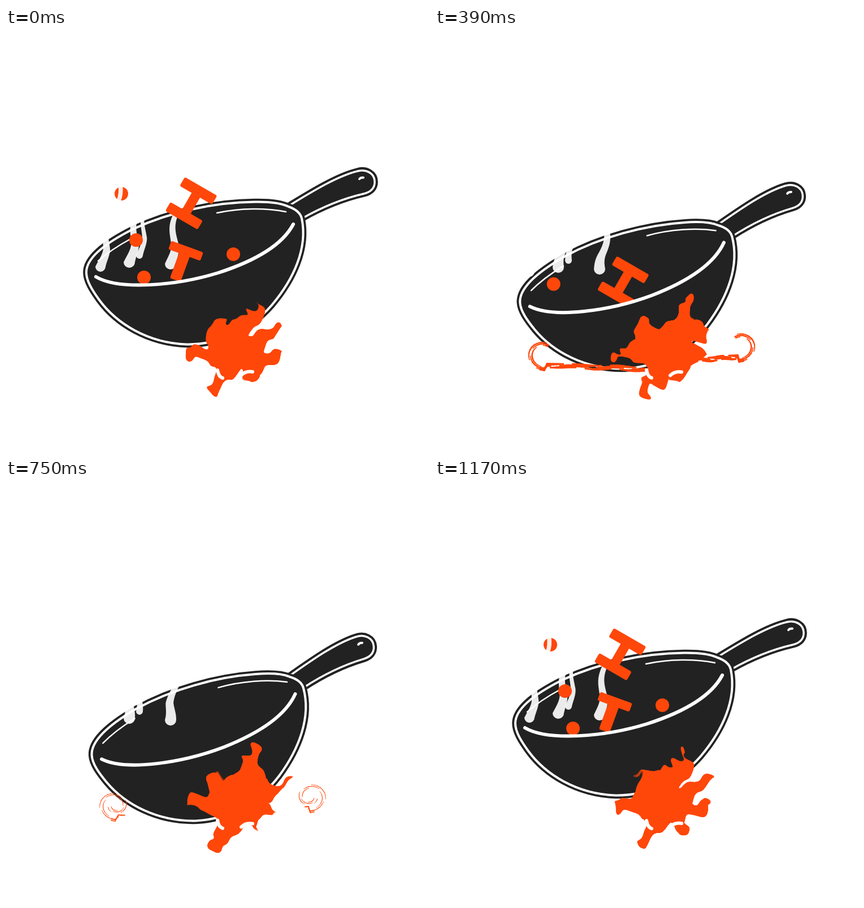
An HTML page with a canvas that plays this animation: 748x748 px, repeating every 1200 ms.

```html
<!DOCTYPE html>
<html lang="en">
<head>
<meta charset="utf-8">
<title>Frying pan</title>
<style>
html, body { margin: 0; width: 100%; height: 100%; overflow: hidden; background: #fff; }
canvas { display: block; }
</style>
</head>
<body>
<canvas id="stage" width="748" height="748"></canvas>
<script>
const ctx = document.getElementById('stage').getContext('2d');
const LOOP = 1200, STEP = 30, TAU = Math.PI * 2;
const ORANGE = '#ff470a', DARK = '#222', WHITE = '#fff';

const { sin, cos, hypot } = Math;
const clamp = x => Math.max(0, Math.min(1, x));
const mix = (a, b, u) => a + (b - a) * u;
const smooth = (from, to, t) => {
  const u = clamp((t - from) / (to - from));
  return u * u * (3 - 2 * u);
};

// ---- pan ----
const RIM = 'M159,440C200,464 300,456 375,433C440,412 488,385 508,347';
const handle = new Path2D('M499,315C540,290 585,262 622,253C637,249 652,257 652,272C652,283 645,290 633,293C598,301 560,316 523,337');
const bowl = new Path2D('M142,432C142,408 170,383 226,355C290,325 370,308 440,307.5C470,307 490,311 500,316C514,321 521,328 523,337C534,390 508,445 470,490C430,536 375,560 320,559.5C250,557 195,522 165,481C152,463 142,447 142,432Z');
const rim = new Path2D(RIM);
const aboveRim = new Path2D(RIM + 'L748,300V-100H-100V440Z');
const shines = new Path2D('M373,327C415,318 460,318 495,325M163,412Q185,392 222,372');
const handleShine = new Path2D('M625,267Q627,264 632,264.5');

function stroke(path, width, color = WHITE) {
  ctx.lineWidth = width;
  ctx.strokeStyle = color;
  ctx.stroke(path);
}

function outlined(path, line) {
  ctx.fillStyle = DARK;
  ctx.fill(path);
  stroke(path, 11.5, DARK);
  stroke(path, line);
}

// The pan sinks first and tilts a little later; both return together.
const lifted = t => smooth(735, 955, t);
const sunk = t => smooth(0, 370, t) - lifted(t);
const tilted = t => smooth(60, 480, t) - lifted(t);

function withPan(t, draw) {
  ctx.translate(657 - 2 * sunk(t), 268 + 24 * sunk(t));
  ctx.rotate(-0.0654 * tilted(t));
  ctx.translate(-657, -268);
  draw();
  ctx.resetTransform();
}

function drawPan() {
  outlined(handle, 3.5);
  outlined(bowl, 4);
  stroke(shines, 2.5);
  stroke(handleShine, 4);
}

// ---- food ----
function boxes(...list) {
  const path = new Path2D();
  for (const box of list) path.roundRect(...box, 3);
  return path;
}
const disc = new Path2D();
disc.arc(0, 0, 12, 0, TAU);

const food = (x, y, dx, dy, more) =>
  ({ x, y, dx, dy, angle: 0, turn: 0, fall: 84, power: 1.75, path: disc, ...more });
const farBall = food(204, 293, 21, 121);
const pieces = [
  food(230, 375, 14, 92),
  food(244, 441, 9, 72),
  food(402, 400, -5, 72),
  food(327.5, 310, 23, 102, { angle: 30, turn: 10, fall: 79, power: 1.55,
    path: boxes([-33, -34.5, 66, 18], [-33, 16.5, 66, 18], [-8.5, -20, 17, 40]) }),
  food(318, 394, 13, 69, { angle: 20, turn: 20,
    path: boxes([-30, -8, 60, 16], [-10, 0, 20, 55]) })
];

function drawFood(items, t) {
  const toTop = ((1140 - Math.min(t, 1140)) / 270) ** 2;
  ctx.save();
  withPan(t, () => ctx.clip(aboveRim));
  ctx.fillStyle = ORANGE;
  for (const f of items) {
    const down = (t / 270) ** f.power, rising = t >= 700;
    ctx.translate(f.x + (rising ? f.dx * toTop : 3 * down), f.y + (rising ? f.dy * toTop : f.fall * down));
    ctx.rotate((f.angle + (rising ? f.turn * toTop : 0)) * TAU / 360);
    ctx.fill(f.path);
    ctx.resetTransform();
  }
  ctx.restore();
}

// ---- steam: x, bottom, half width ----
const wisps = [[167, 431, 9], [218, 424, 10], [236, 408, 6], [291, 427, 10]];

function drawSteam(t) {
  ctx.fillStyle = 'rgba(255,255,255,.91)';
  wisps.forEach(([x, bottom, w], n) => {
    const y = bottom - w + 9 * sunk(t), lean = mix(.23, .14, n / 3), height = 150;
    const edge = (h, side) => {
      const sway = 6 * clamp(h / 30) * sin(h / 17.2 + .65 - t / LOOP * TAU);
      const half = w * (.4 + .6 * Math.exp(-h / 40));
      ctx.lineTo(x + h * lean + sway + side * half, y - h);
    };
    ctx.beginPath();
    ctx.arc(x, y, w, 0, Math.PI);
    for (let h = 0; h <= height; h += 5) edge(h, -1);
    for (let h = height; h >= 0; h -= 5) edge(h, 1);
    ctx.fill();
  });
}

// ---- fire: a star of tapering tongues, bent and torn by rising waves ----
const heart = [402, 572];
const tips = [[322, 577], [360, 515], [445, 482], [486, 535], [482, 580], [435, 622], [374, 646]];
const fireBox = { x: 285, y: 452, w: 230, h: 225 };
const fire = new OffscreenCanvas(fireBox.w, fireBox.h);
const fireCtx = fire.getContext('2d');
const firePixels = fireCtx.createImageData(fireBox.w, fireBox.h);

function heat(x, y, a) {
  const u = x + 7 * sin(y / 14 + 3 * a) + 4 * sin((x + y) / 9 + 4 * a) - heart[0];
  const v = y + 6 * sin(x / 15 - 2 * a) + 4 * sin((x - y) / 8 - 5 * a) - heart[1];
  let best = -99;
  for (const tip of tips) {
    const dx = tip[0] - heart[0], dy = tip[1] - heart[1];
    const along = clamp((u * dx + v * dy) / (dx * dx + dy * dy));
    best = Math.max(best, mix(42, 6, along) - hypot(u - along * dx, v - along * dy));
  }
  return best + 8 * sin(u / 8 + 2 * a) * sin(v / 8 + 5 * a);
}

function drawFire(t) {
  const a = t / LOOP * TAU, { x, y, w, h } = fireBox;
  for (let i = 0; i < w * h; i++) {
    const alpha = clamp(heat(x + i % w, y + Math.floor(i / w), a) + .5);
    firePixels.data.set([255, 71, 10, alpha * 255], i * 4);
  }
  fireCtx.putImageData(firePixels, 0, 0);
  ctx.drawImage(fire, x, y);
  const s = 2 * sin(3 * a);
  stroke(new Path2D(`M374,${605 + s}q2,12 9,14M416,${614 - s}q8,-8 20,-6`), 6);
}

// ---- sparks running outwards along the ground and curling up, in ragged strands ----
function drawSplash(t, startX, startY, cx, cy, side) {
  const head = 1 - (1 - clamp((t - 130) / 600)) ** 2.3;
  const tail = .45 * clamp((t - 520) / 230);
  const width = clamp((930 - t) / 420);
  const count = 64;
  if (!head || !width) return;
  const at = (u, strand) => {
    if (u < .5) return [mix(startX, cx, u * 2), mix(startY, cy + 22, u * 2) - strand * 3 + sin(u * 30)];
    const k = u * 2 - 1, angle = TAU * (.25 + 1.2 * k), r = mix(25, 7, k) + strand * 3;
    return [cx + side * r * cos(angle), cy + .9 * r * sin(angle)];
  };
  ctx.strokeStyle = ORANGE;
  for (let strand = 0; strand < 3; strand++) {
    for (let i = Math.ceil(tail * count); i < head * count; i++) {
      const rough = sin(i * .55 + strand * 2.1);
      if (rough < mix(.2, -.7, width)) continue;
      ctx.lineWidth = width * (i > count / 2 ? 2.6 : 4.5) * (.75 + .25 * rough);
      ctx.beginPath();
      ctx.moveTo(...at(i / count, strand));
      ctx.lineTo(...at((i + 1) / count, strand));
      ctx.stroke();
    }
  }
}

function draw(now) {
  const t = Math.floor(now % LOOP / STEP) * STEP;
  ctx.fillStyle = WHITE;
  ctx.fillRect(0, 0, 748, 748);
  ctx.lineCap = ctx.lineJoin = 'round';
  withPan(t, drawPan);
  drawFood([farBall], t);
  drawSteam(t);
  drawFood(pieces, t);
  withPan(t, () => stroke(rim, 6));
  drawSplash(t, 372, 606, 193, 577, 1);
  drawSplash(t, 440, 592, 538, 562, -1);
  drawFire(t);
  requestAnimationFrame(draw);
}
requestAnimationFrame(draw);
</script>
</body>
</html>
```
